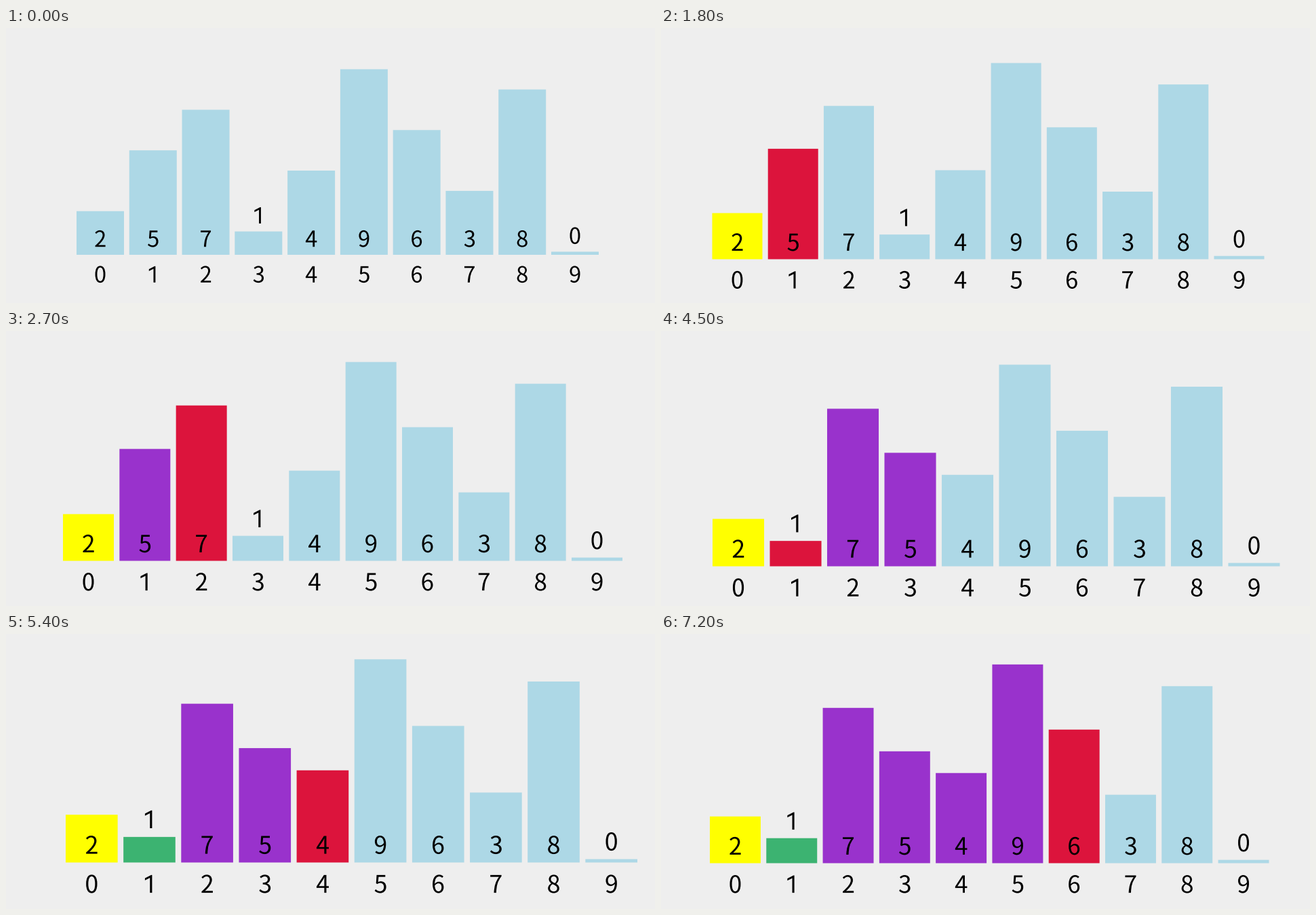
These frames come from a looping animation (957x405 px, 8 s). A matplotlib script:

```python
from itertools import islice

import matplotlib.pyplot as plt
from matplotlib.animation import FuncAnimation
from matplotlib.patches import PathPatch, Rectangle
from matplotlib.path import Path
from matplotlib.textpath import TextPath
from matplotlib.transforms import Affine2D

W, H, DPI = 957, 405, 64
INTERVAL, FRAMES, HOLD = 100, 80, 9

VALUES = [2, 5, 7, 1, 4, 9, 6, 3, 8, 0]
IDLE, PIVOT, SCAN = "lightblue", "yellow", "crimson"
LARGE, SMALL = "darkorchid", "mediumseagreen"

# Key poses: the chart jumps to a new left edge, right edge and base line
# with every step; all other sizes follow from these.
POSES = [(104, 874, 334), (114, 899, 342), (75.5, 889.5, 340.5),
         (84, 909, 338.5), (85.5, 929, 341), (76, 912.5, 346.5),
         (88, 931, 336.5), (101.5, 921, 338.5), (72, 896.5, 337.5)]

# Proportions of the chart, in bar pitches.
BAR_W, BAR_MIN, BAR_UNIT = 0.9, 0.058, 0.384
EM, TEXT_RISE, LABEL_DROP = 0.42, 0.305, 0.37
DIGIT_H = 0.733  # in ems


def partition_steps(values):
    """Yield the values and bar colours after each step of a quicksort pass."""
    vals, roles, store = list(values), {}, 0
    yield list(vals), dict(roles)
    roles[0] = PIVOT
    yield list(vals), dict(roles)
    for i in range(1, len(vals)):
        yield list(vals), {**roles, i: SCAN}
        roles[i] = LARGE
        if vals[i] < vals[0]:
            store += 1
            vals[i], vals[store] = vals[store], vals[i]
            yield list(vals), {**roles, store: SCAN}
            roles[store] = SMALL


def plain_one():
    """A one without a foot: a stem and a slanted flag, one unit high."""
    right, left, tip = 0.15, 0.03, -0.25
    pts = [(left, 0), (right, 0), (right, 1), (right - 0.05, 1),
           (tip, 0.82), (tip, 0.70), (left, 0.84), (left, 0)]
    return Path(pts, closed=True).transformed(
        Affine2D().translate(0, -0.5).scale(DIGIT_H))


def digit_path(digit):
    """Outline of a digit, one em in size and centred on the origin."""
    if digit == 1:
        return plain_one()
    path = TextPath((0, 0), str(digit), size=1,
                    prop={"family": "Noto Sans CJK JP"})
    box = path.get_extents()
    return path.transformed(
        Affine2D().translate(-(box.x0 + box.x1) / 2, -DIGIT_H / 2))


STEPS = list(islice(partition_steps(VALUES), len(POSES)))
DIGITS = [digit_path(d) for d in range(10)]

fig = plt.figure(figsize=(W / DPI, H / DPI), dpi=DPI, facecolor="#eeeeee")
ax = fig.add_axes([0, 0, 1, 1])
ax.set(xlim=(0, W), ylim=(H, 0))
ax.axis("off")


def draw_digit(digit, x, y, em):
    place = Affine2D().scale(em, -em).translate(x, y)
    ax.add_patch(PathPatch(DIGITS[digit].transformed(place),
                           facecolor="black", linewidth=0, snap=False))


def draw(frame):
    for patch in list(ax.patches):
        patch.remove()
    step = frame // HOLD
    vals, roles = STEPS[step]
    left, right, base = POSES[step]
    pitch = (right - left) / (len(vals) - 1 + BAR_W)
    width = BAR_W * pitch
    for i, v in enumerate(vals):
        x = left + i * pitch
        height = (BAR_MIN + BAR_UNIT * v) * pitch
        ax.add_patch(Rectangle((x, base - height), width, height, snap=False,
                               facecolor=roles.get(i, IDLE), linewidth=0))
        # Numbers that do not fit inside a bar sit on top of it.
        foot = base - height if v < 2 else base
        mid = x + width / 2
        draw_digit(v, mid, foot - TEXT_RISE * pitch, EM * pitch)
        draw_digit(i, mid, base + LABEL_DROP * pitch, EM * pitch)
    return ax.patches


anim = FuncAnimation(fig, draw, frames=FRAMES, interval=INTERVAL,
                     init_func=lambda: [], repeat=True, repeat_delay=0)
plt.show()
```
